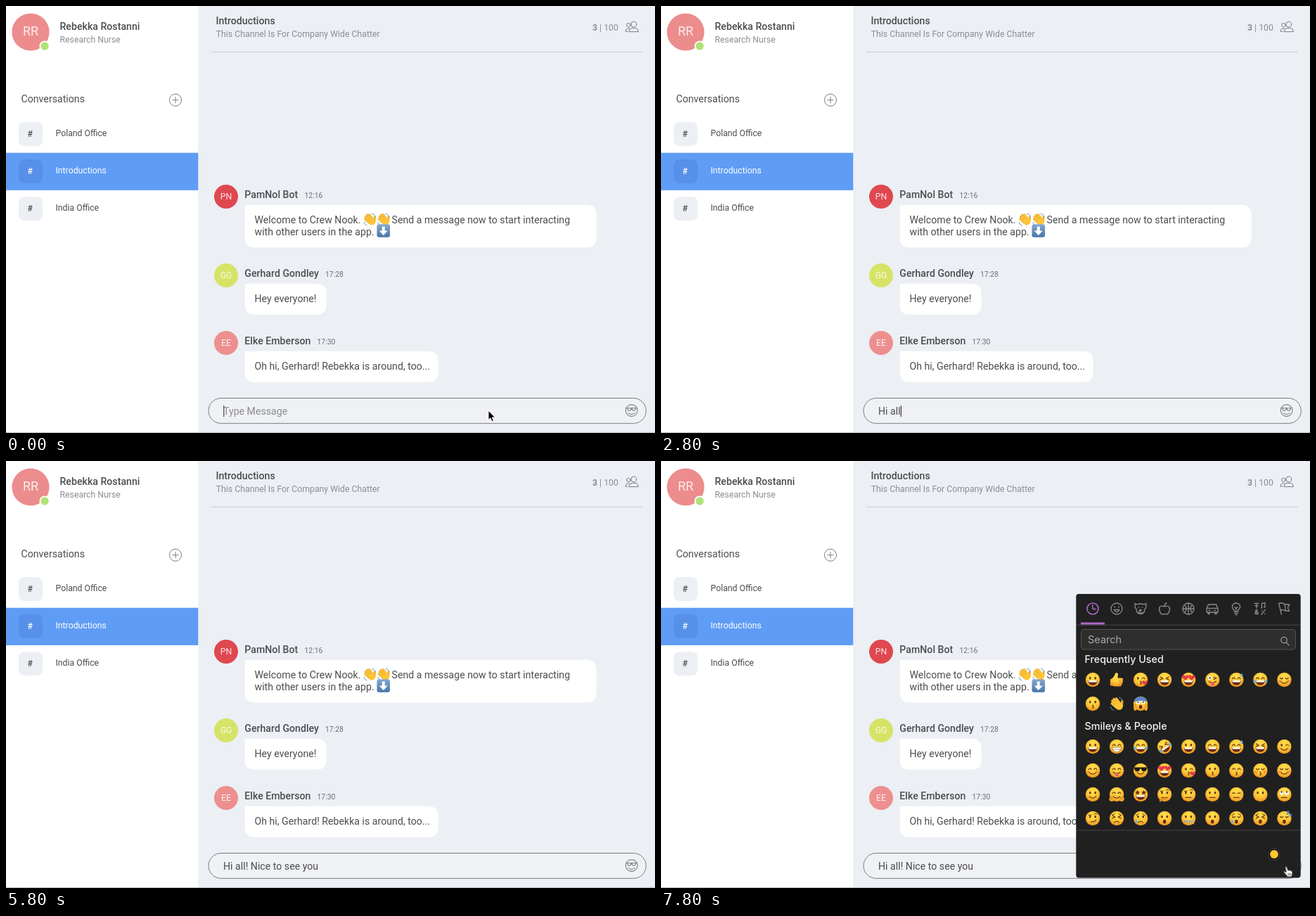
An HTML page that plays this animation: 923x607 px, repeating every 8 s.

```html
<!DOCTYPE html>
<html lang="en">
<head>
<meta charset="utf-8">
<title>Chat with emoji picker</title>
<style>
html, body { margin: 0; width: 100%; height: 100%; overflow: hidden; background: #eceff4; }
svg { display: block; width: 100%; height: 100%; }
text { font: 14.17px Roboto, sans-serif; fill: #4b4d51; white-space: pre; }
.strong { font-weight: 500; }
.small { font-size: 12.28px; }
.time { font-size: 10.4px; fill: #6c6f74; }
.muted { fill: #8b8d92; }
.mid { text-anchor: middle; }
.light { fill: #fff; }
.pale { fill: #fff; opacity: .85; }
.line { fill: none; stroke: #7b7d81; stroke-linecap: round; stroke-linejoin: round; }
#panel text { font: 500 14.3px Inter, sans-serif; fill: #f2f2f2; }
#panel .hint { font-weight: 400; font-size: 14.5px; fill: #a9a9a9; }
#tabs { stroke: #8d8d8d; stroke-width: 1.3; }
#arrow { animation: arrow 8s linear infinite; }
#hand { animation: hand 8s linear infinite; }
#panel { animation: panel 8s linear infinite; }
@keyframes arrow {
  0%, 14.49% { transform: translate(686px, 575px); opacity: 1; }
  14.5% { transform: translate(686px, 575px); opacity: 0; }
  74.39% { transform: translate(790px, 569px); opacity: 0; }
  74.4% { transform: translate(790px, 569px); opacity: 1; }
  79.39% { transform: translate(878px, 571px); opacity: 1; }
  79.4%, 100% { transform: translate(878px, 571px); opacity: 0; }
}
@keyframes hand {
  0%, 79.39% { transform: translate(881px, 572px); opacity: 0; }
  79.4% { transform: translate(881px, 572px); opacity: 1; }
  84%, 100% { transform: translate(884.5px, 575.5px); opacity: 1; }
}
@keyframes panel {
  0%, 89.49% { opacity: 0; }
  89.5%, 100% { opacity: 1; }
}
</style>
</head>
<body>
<svg viewBox="0 0 923 607" preserveAspectRatio="none">
  <defs>
    <radialGradient id="skin" cx=".5" cy=".3" r=".74">
      <stop offset="0" stop-color="#ffe052"/><stop offset=".55" stop-color="#fdc537"/><stop offset="1" stop-color="#e98c1c"/>
    </radialGradient>
    <linearGradient id="key" x2="0" y2="1">
      <stop offset="0" stop-color="#86a9cd"/><stop offset="1" stop-color="#4776a9"/>
    </linearGradient>
  </defs>
  <rect width="923" height="607" fill="#eceff4"/>
  <rect width="273.3" height="607" fill="#fff"/>

  <circle cx="35" cy="37" r="26.6" fill="#ec8c8d"/>
  <text class="mid pale" x="35" y="42.3" style="font-size:18px">RR</text>
  <circle cx="55" cy="57" r="7.6" fill="#fff"/>
  <circle cx="55" cy="57" r="5.7" fill="#b0e277"/>
  <text class="strong" x="76.5" y="34.3">Rebekka Rostanni</text>
  <text class="small muted" x="76.5" y="52.3">Research Nurse</text>
  <text x="21.5" y="136.5">Conversations</text>
  <g class="line"><circle cx="241" cy="133.7" r="8.6"/><path d="M236.8 133.7h8.4M241 129.5v8.4"/></g>
  <g id="rooms"></g>

  <text class="strong" x="298.5" y="26">Introductions</text>
  <text class="small muted" x="298.8" y="44.3">This Channel Is For Company Wide Chatter</text>
  <text class="small muted" x="834" y="34.8"><tspan font-weight="700">3</tspan> | 100</text>
  <g class="line">
    <circle cx="892.8" cy="26" r="3.9"/><path d="M886 36.2q0-4.2 4-4.8h5.4q4 .6 4 4.8z"/>
    <circle cx="885.4" cy="27" r="2.7"/><path d="M884 36.2h-3q0-3.6 3-4.3h2.4"/>
  </g>
  <path d="M292 65.3h614" stroke="#a9acb1" stroke-dasharray="1 1"/>
  <g id="messages"></g>

  <rect x="288" y="557.5" width="622.3" height="35.8" rx="17.9" fill="#f0f1f5" stroke="#7a7c80"/>
  <text id="typed" xml:space="preserve" x="309" y="580.6"></text>
  <path id="caret" d="M309.8 568v16" stroke="#333" stroke-width="1.1"/>
  <g class="line" stroke-width="1.1">
    <circle cx="889.7" cy="575" r="8.4"/>
    <path d="M882 571.5h15.4M884 571.8q.2 3.4 2.6 3.4t2.6-3.2h1q.2 3.2 2.6 3.2t2.6-3.4M885.2 578.4q4.5 4 9 0"/>
  </g>
  <path d="M0 606.4h923" stroke="#b4b7bb"/>

  <g id="arrow"><path d="M0 0v13.4l3-2.7 2.1 4.9 2.4-1-2.1-4.7h4.1z" fill="#000" stroke="#fff" stroke-width="1"/></g>

  <g id="panel">
    <rect x="590.3" y="189" width="319.4" height="403.6" rx="4" fill="#202020"/>
    <path d="M591 233.2h318M591 525h318" stroke="#474747"/>
    <path d="M597 231h34" stroke="#ab68c4" stroke-width="3"/>
    <g id="tabs" class="line"></g>
    <rect x="597.5" y="239.5" width="305" height="28.5" rx="4" fill="#2e2e2e" stroke="#555"/>
    <text class="hint" x="607" y="259">Search</text>
    <g class="line" style="stroke:#a0a0a0" stroke-width="1.2"><circle cx="886" cy="254.6" r="4.3"/><path d="M889.2 257.8l4 4"/></g>
    <text x="602.5" y="287.3">Frequently Used</text>
    <text x="602.5" y="382.3">Smileys &amp; People</text>
    <g id="faces"></g>
    <circle cx="872" cy="559" r="8" fill="#111" stroke="#4b4b4b" stroke-width=".8"/>
    <circle cx="872" cy="559" r="5.9" fill="#ffc731"/>
  </g>

  <g id="hand">
    <path d="M3 1.6q1.6-1.7 2.8.3l1.5 4.4q1.3-.8 2.2.3 1.3-.7 2.1.5 1.4-.3 1.8 1.2l.4 3-1 2.4v2H6l-.8-1.9-4.4-4.9q-.7-1.7 1.2-1.4l2.5 1.6z" fill="#fff" stroke="#111" stroke-width="1"/>
    <path d="M7.4 10.5v3M9.2 10.5v3M11 10.5v3" stroke="#111" stroke-width=".8"/>
  </g>
</svg>
<script>
const $ = id => document.getElementById(id);
const BROWN = '#63350f';
const stroke = (d, color = BROWN, width = 1.2, fill = 'none') =>
  `<path d="${d}" stroke="${color}" stroke-width="${width}" fill="${fill}" stroke-linecap="round" stroke-linejoin="round"/>`;
const fill = (d, color) => `<path d="${d}" fill="${color}"/>`;
const oval = (x, y, rx, ry, color) => `<ellipse cx="${x}" cy="${y}" rx="${rx}" ry="${ry}" fill="${color}"/>`;
const both = draw => draw(-3.7) + draw(3.7);
const at = (x, y, body, extra = '') => `<g transform="translate(${x} ${y}) ${extra}">${body}</g>`;
const heart = (x, y, s) => at(x, y, fill('M0 3Q-6-1-3-3-1-4 0-1.5 1-4 3-3 6-1 0 3', '#e9384b'), `scale(${s})`);
const drop = (x, y) => fill(`M${x} ${y}q-3.2 5 0 5.2t0-5.2`, '#55b4ee');
const star = 'M0-3.8L1.1-1.2 3.8-1 1.7.8 2.4 3.4 0 2-2.4 3.4-1.7.8-3.8-1-1.1-1.2z';

const eyes = {
  o: () => both(x => oval(x, -2.4, 1.3, 1.9, BROWN)),
  '^': () => both(x => stroke(`M${x - 2}-1.4q2-3.6 4 0`)),
  c: () => both(x => stroke(`M${x - 2}-2.6q2 2.8 4 0`)),
  '-': () => both(x => stroke(`M${x - 2}-1.8h4`)),
  x: () => stroke('M-6-4l3.8 2.1-3.8 1.8M6-4L2.2-1.9 6-.1'),
  w: () => oval(-3.7, -2.2, 1.3, 1.9, BROWN) + stroke('M2-1.5q2-3 4 0'),
  h: () => heart(-4.5, -2.8, 1.2) + heart(4.5, -2.8, 1.2),
  s: () => fill('M-9.4-4.6H9.4L8.3-.8Q7 1.4 4.2 1.2 1.6 1 .8-2.6H-.8Q-1.6 1-4.2 1.2-7 1.4-8.3-.8z', '#15151a'),
  t: () => both(x => at(x * 1.2, -2.8, fill(star, '#7b2c18'))),
  r: () => both(x => oval(x, -2, 2.8, 2.8, '#fff') + oval(x, -3.5, 1.2, 1.2, BROWN)),
  W: () => both(x => oval(x, -2.2, 2.8, 3, '#fff') + oval(x, -2.2, 1, 1.2, BROWN)),
  y: () => oval(-3.7, -2.6, 2.8, 2.8, '#fff') + oval(-3.5, -2.6, 1.2, 1.4, BROWN) + stroke('M1.8-3.8l3.8 1.6-3.8 1.6')
};
const mouths = {
  D: () => fill('M-6.6 1H6.6Q6 7.8 0 7.8T-6.6 1', '#6b2b14') + fill('M-6 1.1H6L5.4 3.5H-5.4z', '#fff'),
  T: () => stroke('M-6.6 1H6.6Q6 7.6 0 7.6T-6.6 1M-5.6 4H5.6', '#a06a2b', .7, '#fff'),
  u: () => stroke('M-4.8 2.6Q0 7.6 4.8 2.6'),
  n: () => stroke('M-3.4 5.8Q0 2.4 3.4 5.8'),
  '-': () => stroke('M-3.8 4.4h7.6'),
  q: () => stroke('M-2.5 4.8Q2.5 5.6 4.8 2.4'),
  3: () => stroke('M-.6 2q3 .8.3 2.2 3 1 0 2.3', BROWN, 1.1),
  p: () => stroke('M-5 2.2Q0 6.6 5 2.2') + fill('M-2 4h4.6v2.8q-2.3 4-4.6 0z', '#ef5a70'),
  O: () => oval(0, 4.6, 2.3, 2.8, '#6b2b14'),
  z: () => stroke('M-5.6 4.2H5.6', '#8a8d92', 2.4) + stroke('M-5 4.2H5M5.6 4.2l2 3.6', '#e2e4e6', .8),
  _: () => ''
};
const extras = {
  j: () => drop(-8.4, -1) + drop(8.4, -1),
  d: () => drop(7.6, -9.5),
  g: () => drop(-6, 1.5),
  k: () => heart(6, 4.5, 1),
  b: () => both(x => oval(x * 1.7, 1.8, 2.3, 1.6, '#ee6a4599')),
  H: () => both(x => oval(x * 1.9, 6.6, 3.6, 3.3, '#f4a82c') + stroke(`M${x * 1.9 - 1.6} 4.6v2m2-2.4v2`, '#b46d16', .7)),
  i: () => stroke('M-6 9.2Q-5.4 5.6 1.8 5.6', '#e58d1d', 2.6),
  e: () => stroke('M1.6-6q2.4-2 4.6.2M-6-4.7h4', BROWN, 1),
  f: () => stroke('M-6.4-4.6Q-4-5-2.6-6.6M6.4-4.6Q4-5 2.6-6.6', BROWN, 1),
  Z: () => stroke('M3.5-10h3.4l-3.4 4h3.4M8-6h2.4L8-3.4h2.4', '#4e83d8', 1.2),
  m: () => fill('M-9.7-2.4A10 10 0 0 1 9.7-2.4Q0-6-9.7-2.4', '#5a86cf') +
    both(x => oval(x * 2.1, 5, 2.3, 5, '#f0a42b'))
};

function face(spec) {
  const [eye, mouth, ...rest] = spec;
  const marks = rest.filter(c => extras[c]).map(c => extras[c]()).join('');
  const body = `<circle r="10.2" fill="url(#skin)"/>` + eyes[eye]() + mouths[mouth]() + marks;
  return rest.includes('*') ? at(0, 0, body, 'rotate(-35)') : body;
}

function wave() {
  const fingers = [[-5.2, -5.4], [-2.4, -8], [.9, -8.6], [4, -7]];
  const hand = fingers.map(([x, y]) => {
    const d = `M${x * .8 + .6} 3L${x} ${y}`;
    return stroke(d, '#d98f1f', 3.5) + stroke(d, '#fdc83b', 2.6);
  }).join('') + stroke('M4 6L8.4.8', '#f3ad2b', 3.2) + oval(.6, 4, 5.4, 5.2, '#fdc436');
  return at(.6, .8, hand, 'rotate(-38)') + stroke('M3.4-9q4.4.8 5.4 5M-8.8 4.5q.6 4 4.4 5', '#5f93b8', 1);
}
const thumb = () => fill('M-9.2-.6Q-4-2-1.8-9.4 1.6-11 2-7.4L1.3-2.6H7.6Q10-1.8 8.6.6 9.8 2.6 8.2 4 8.7 6 7 7 6.8 9.6 4 9.6H-2.6L-9.2 8z', 'url(#skin)') +
  stroke('M3 .7h5M3 3.9h4.7M3 6.9h3.6', '#d98d1f', .8);

const grid = [
  [311, 'oD thumb w3k xD hD yp ^Dd ^Dj cub'],
  [345, 'o3 wave WOm'],
  [406, 'oD ^T ^Dj xDj* oD ^D ^Dd xD wu'],
  [440, '^ub ^p su hD w3k o3 ^3 c3b cub'],
  [474, 'ou ^uH tD o-ie o-e o- -- o_ r-'],
  [508, 'oqe xnf ongf oO oz oO cOgf xOf cOZ']
];
const special = { wave, thumb };
$('faces').innerHTML = grid.map(([y, row]) => row.split(' ').map((spec, i) =>
  at(614 + 34.05 * i, y, special[spec] ? special[spec]() : face(spec))).join('')).join('');

const ring = '<circle r="8"/>';
const tabs = [
  `<g stroke="#ab68c4" stroke-width="1.6">${ring}<path d="M0-5V.5H4.5"/></g>`,
  ring + '<path d="M-4 1.5Q0 8 4 1.5zM-3-3v1M3-3v1"/>',
  '<path d="M-5-6Q0-8 5-6L8-7.4 7.6-1 6 0Q6 7.5 0 7.5T-6 0L-7.6-1-8-7.4zM-2.6-2v.6M2.6-2v.6M-1.5 1.6h3L0 3zv2.4M-3 5q3 2 6 0"/>',
  '<path d="M0-3Q-7.5-6-7.5 1-6 8-2.6 8 0 7 2.6 8 6 8 7.5 1 7.5-6 0-3-.4-6 3-8.4"/>',
  ring + '<path d="M-8 0H8M0-8V8M-5.6-5.6Q0 0-5.6 5.6M5.6-5.6Q0 0 5.6 5.6"/>',
  '<path d="M-8 5V0L-5.6-6H5.6L8 0V5zM-8-.6H8M-6 5v2.5h2V5M4 5v2.5h2V5M-5 2.2h2M3 2.2h2"/>',
  '<path d="M-2.6 4Q-2.6 2-4.6 0-7-4.5-3.5-7 0-9 3.5-7 7-4.5 4.6 0 2.6 2 2.6 4zM-2.4 6.4h4.8M-1 8.5h2M-2-2.5L0 0 2-2.5M0 0v4"/>',
  '<path d="M-8-7.6h6M-5-7.6V-1M-7-4.4h4M2.5-1.4V-7.6L7-8.4v6M2-1.2h-.8M6.4-2h-.8M-3 8L-6.6 3q2-3.4 3 0L-7.4 6q1.4 3.6 4.8-.6M2 8L7.4 1.4M2.6 2.4v.4M6.8 7v.4"/>',
  '<path d="M-7.4-7.5L-3.6 8M-7.4-7.5Q-3-9.4 1-6.5L7.8-6 5.4-1.4 7.5 3.4 1.6 3Q-2 .6-5.4 2M1-6.5L2.6 3"/>'
];
$('tabs').innerHTML = tabs.map((icon, i) => at(614 + 34 * i, 210, icon)).join('');

const label = (x, y, words, kind = '') => `<text x="${x}" y="${y}" class="${kind}">${words}</text>`;

$('rooms').innerHTML = ['Poland Office', 'Introductions', 'India Office'].map((name, i) => {
  const y = 182 + 53.1 * i, active = i === 1, tone = active ? 'light' : '';
  return (active ? '<rect y="208.7" width="273.3" height="53.2" fill="#5f9cf5"/>' : '') +
    `<rect x="18" y="${y - 17}" width="34" height="34" rx="8" fill="${active ? '#5790e8' : '#eceff4'}"/>` +
    label(34.2, y + 4.2, '#', `small strong mid ${tone}`) + label(70.5, y + 3.2, name, `small ${tone}`);
}).join('');

function message(y, initials, color, name, timeX, time, w, h, body) {
  const top = y + 11.8;
  return `<circle cx="313" cy="${y}" r="17" fill="${color}"/>` + label(313, y + 4.4, initials, 'small mid pale') +
    label(339.3, y + 2.2, name, 'strong') + label(timeX, y + 2.2, time, 'time') +
    fill(`M339.7 ${top}h${w - 14}q14 0 14 14v${h - 28}q0 14-14 14h${28 - w}q-14 0-14-14z`, '#fff') + body;
}
const downKey = '<rect x="-9.3" y="-9.3" width="18.6" height="18.6" rx="3" fill="url(#key)"/>' +
  fill('M-2-6H2V0H6L0 6.4-6 0H-2z', '#fff');
const welcome = label(353.5, 309.4, 'Welcome to Crew Nook.') + label(548.6, 309.4, 'Send a message now to start interacting') +
  label(353.5, 325.6, 'with other users in the app.') +
  at(517.3, 303.3, wave(), 'scale(.92)') + at(537, 303.3, wave(), 'scale(.92)') + at(536.8, 319.5, downKey);
$('messages').innerHTML =
  message(271, 'PN', '#df484f', 'PamNol Bot', 424.5, '12:16', 500, 60.5, welcome) +
  message(383, 'GG', '#d7e366', 'Gerhard Gondley', 454, '17:28', 116, 44, label(353.5, 421.2, 'Hey everyone!')) +
  message(479, 'EE', '#ed8f8f', 'Elke Emberson', 442.5, '17:30', 275, 44, label(353.5, 517.2, 'Oh hi, Gerhard! Rebekka is around, too...'));

const phrase = 'Hi all! Nice to see you';
// [time in ms, characters typed by then]
const keys = [[1160, 1], [1560, 2], [2160, 3], [2360, 4], [2560, 5], [2760, 6], [2960, 7], [3160, 8], [3560, 9],
  [3760, 11], [3960, 13], [4160, 15], [4360, 17], [4560, 20], [4760, 21], [4960, 23]];
const typed = $('typed'), caret = $('caret');
const start = performance.now();

function render(now) {
  const t = Math.max(0, now - start) % 8000;
  const count = keys.reduce((n, [time, chars]) => t >= time ? chars : n, 0);
  const words = count ? phrase.slice(0, count) : 'Type Message';
  if (typed.textContent !== words) {
    typed.textContent = words;
    typed.setAttribute('class', count ? '' : 'muted');
    caret.setAttribute('transform', `translate(${count ? typed.getComputedTextLength() : 0} 0)`);
  }
  const blinkOff = t < 1160 ? t >= 500 && t < 1000 : t > 4960 && (t - 4960) % 1000 >= 500;
  caret.setAttribute('visibility', blinkOff || t >= 6900 ? 'hidden' : 'visible');
  requestAnimationFrame(render);
}
render(start);
</script>
</body>
</html>
```
